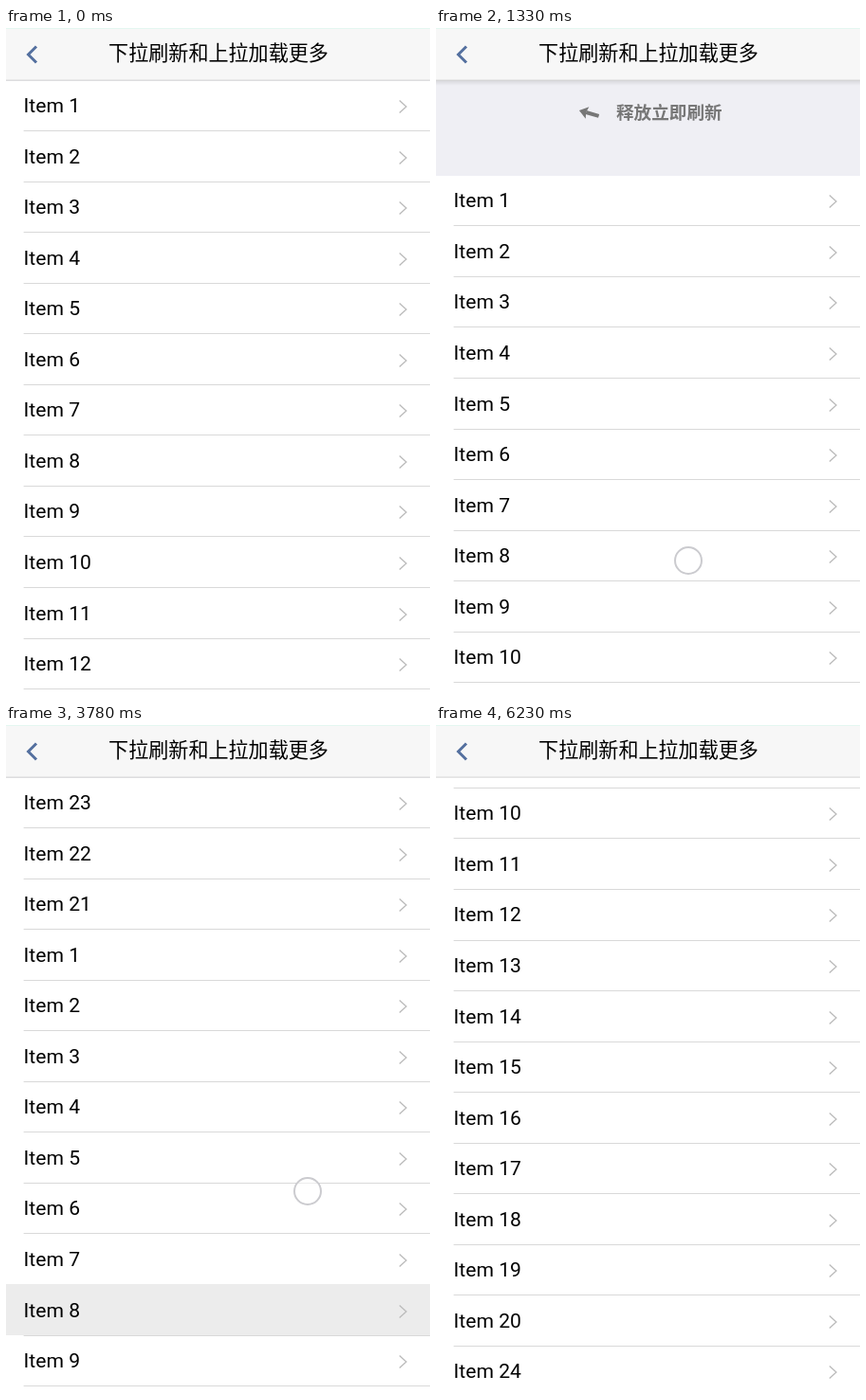
Recreate the animation shown at these times as an HTML page with a canvas. Size 447 px wide and 706 px high, loop 7000 ms.

```html
<!DOCTYPE html>
<html lang="zh-CN">
<head>
<meta charset="utf-8">
<style>
html, body { margin: 0; width: 100%; height: 100%; overflow: hidden; background: #fff; }
canvas { display: block; }
</style>
</head>
<body>
<canvas id="stage" width="447" height="706"></canvas>
<script>
const ctx = document.getElementById('stage').getContext('2d');
const WIDTH = 447, BOTTOM = 705, LOOP = 7000, STEP = 70;
const LIST_TOP = 55.5, ROW = 53.55, POCKET = 62, MAX_SCROLL = 631.2;
const FONT = 'Roboto, "Noto Sans CJK SC", "Noto Sans CJK", "Noto Sans", sans-serif';

const RELEASE = 1890, REFRESHED = 2940, LOADING = 4480, LOADED = 6160;
const ARMED = 1060;   // the pull passes the refresh threshold

const numbers = (from, to) => Array.from({ length: to - from + 1 }, (_, i) => from + i);
const firstItems = numbers(1, 20);
const refreshedItems = [23, 22, 21, ...firstItems];
const loadedItems = [...refreshedItems, 24, 25, 26];

// Touch points: time, x, y, opacity
const pullTouch = [[490, 304, 322, 1], [630, 300, 330, 1], [980, 274, 444, 1], [1330, 266, 562, 1],
  [1600, 266, 588, 1], [1960, 266, 588, 1], [2030, 266, 588, .4], [2100, 266, 588, 0]];
const swipeTouch = [[3570, 323, 617, .5], [3640, 323, 617, 1], [3710, 321, 575, 1], [3780, 318, 492, 1],
  [3920, 314, 230, 1], [4060, 314, 200, 0]];

function at(keys, t) {
  let i = keys.findIndex(key => key[0] > t);
  if (i < 0) return keys[keys.length - 1].slice(1);
  if (i === 0) return keys[0].slice(1);
  const a = keys[i - 1], b = keys[i], p = (t - a[0]) / (b[0] - a[0]);
  return a.slice(1).map((v, k) => v + (b[k + 1] - v) * p);
}
const clamp = v => Math.max(0, Math.min(1, v));

// Positive while pulled down, negative while scrolled
function listOffset(t) {
  if (t < 490) return 0;
  if (t < 1820) return Math.max(0, 50.4 + (at(pullTouch, t)[1] - 444) * .423);
  if (t < REFRESHED) return at([[1820, 111.3], [1890, 95], [2030, 70.4], [2100, 65], [2170, POCKET]], t)[0];
  if (t < 3780) return POCKET * (1 - clamp((t - REFRESHED + STEP) / 560)) ** 2;
  return -MAX_SCROLL * (1 - (1 - clamp((t - 3780) / 420)) ** 2);
}

function rect(color, x, y, w, h) {
  ctx.fillStyle = color;
  ctx.fillRect(x, y, w, h);
}

function text(value, x, y, size, color, weight = 400, align = 'left') {
  ctx.font = `${weight} ${size}px ${FONT}`;
  ctx.fillStyle = color;
  ctx.textAlign = align;
  ctx.fillText(value, x, y);
}

function polyline(color, width, ...points) {
  ctx.strokeStyle = color;
  ctx.lineWidth = width;
  ctx.beginPath();
  points.forEach(([x, y]) => ctx.lineTo(x, y));
  ctx.stroke();
}

function spinner(x, y, elapsed) {
  const turns = Math.floor(elapsed * .012);
  ctx.save();
  ctx.translate(x, y);
  ctx.lineCap = 'round';
  for (let i = 0; i < 12; i++) {
    ctx.save();
    ctx.rotate((i + turns) * Math.PI / 6);
    ctx.globalAlpha = i < 6 ? .27 : .27 + (i - 5) * .097;
    polyline('#6c6c6c', 2.7, [0, -13.1], [0, -8.2]);
    ctx.restore();
  }
  ctx.restore();
}

function pullArrow(x, y, degrees) {
  ctx.save();
  ctx.translate(x, y);
  ctx.rotate(degrees * Math.PI / 180);
  rect('#777', -2, -10.5, 4, 14);
  ctx.beginPath();
  [[-6.5, 2], [0, 3.5], [6.5, 2], [0, 11]].forEach(([px, py]) => ctx.lineTo(px, py));
  ctx.fill();
  ctx.restore();
}

const caption = (value, x, y, align) => text(value, x, y, 18.6, '#777', 700, align);

function topPocket(t) {
  if (t < RELEASE) {
    pullArrow(161.5, 90, 180 * clamp((t - ARMED) / 458));
    caption(t < ARMED ? '下拉可以刷新' : '释放立即刷新', 190, 96);
  } else {
    spinner(171.5, 89.5, t - 2030);
    caption('正在刷新...', 200, 96);
  }
}

function bottomPocket(t, top) {
  rect('#efeff4', 0, top, WIDTH, BOTTOM - top);
  if (t < LOADING) {
    caption('上拉显示更多', WIDTH / 2, top + 29, 'center');
  } else {
    spinner(171.5, top + 23, t - 4560);
    caption('正在加载...', 200, top + 29);
  }
}

function list(t, offset) {
  const items = t < REFRESHED ? firstItems : t < LOADED ? refreshedItems : loadedItems;
  const pressed = t >= 3640 && t < 3850 ? 8 : 0;
  const top = LIST_TOP + offset;
  rect('#fff', 0, Math.round(top), WIDTH, items.length * ROW);
  items.forEach((item, i) => {
    const y = top + i * ROW;
    if (y < -ROW || y > 706) return;
    if (item === pressed) rect('#ececec', 0, Math.round(y) - 1, WIDTH, 54);
    text('Item ' + item, 18.6, Math.round(y + 33.5), 21.1, '#000');
    const mid = Math.round(y + 27.5);
    polyline('#bbb', 1.3, [414.8, mid - 6.5], [422, mid], [414.8, mid + 6.5]);
    rect('#d9d9d9', 18.6, Math.round(y + ROW) - 1, WIDTH, 1);
  });
  const end = Math.round(top + items.length * ROW);
  if (end < BOTTOM) bottomPocket(t, end);
}

function scrollbar(offset) {
  const track = BOTTOM - LIST_TOP, height = 329;
  ctx.fillStyle = 'rgba(0,0,0,.35)';
  ctx.beginPath();
  ctx.roundRect(443, LIST_TOP + (track - height) * -offset / MAX_SCROLL, 4, height, 2);
  ctx.fill();
}

function header() {
  rect('#f7f7f7', 0, 0, WIDTH, 55);
  rect('#e4f7f1', 0, 0, WIDTH, 1);
  rect('#d2d2d2', 0, 54.6, WIDTH, 1);
  polyline('#54709f', 3, [32, 19.5], [23.5, 28], [32, 36.5]);
  text('下拉刷新和上拉加载更多', 224, 34, 21.08, '#000', 400, 'center');
}

function headerShadow() {
  const shade = ctx.createLinearGradient(0, 55, 0, 61);
  shade.addColorStop(0, 'rgba(0,0,0,.1)');
  shade.addColorStop(1, 'rgba(0,0,0,0)');
  rect(shade, 0, 55, WIDTH, 6);
}

function touch(keys, t) {
  if (t < keys[0][0]) return;
  const [x, y, alpha] = at(keys, t);
  ctx.globalAlpha = alpha;
  ctx.beginPath();
  ctx.arc(x, y, 14, 0, 7);
  ctx.fillStyle = 'rgba(255,255,255,.5)';
  ctx.fill();
  ctx.strokeStyle = '#cbcbcf';
  ctx.lineWidth = 2;
  ctx.stroke();
  ctx.globalAlpha = 1;
}

function draw() {
  const now = performance.now() % LOOP;
  const t = Math.floor(now / STEP) * STEP;
  const offset = listOffset(t);
  rect('#efeff4', 0, 0, WIDTH, 706);
  if (offset > 0) {
    headerShadow();
    topPocket(t);
  }
  list(t, offset);
  rect('#fff', 0, BOTTOM, WIDTH, 1);
  if (t >= 3850 && t < 4340) scrollbar(offset);
  header();
  touch(pullTouch, t);
  touch(swipeTouch, t);
  requestAnimationFrame(draw);
}
draw();
</script>
</body>
</html>
```
